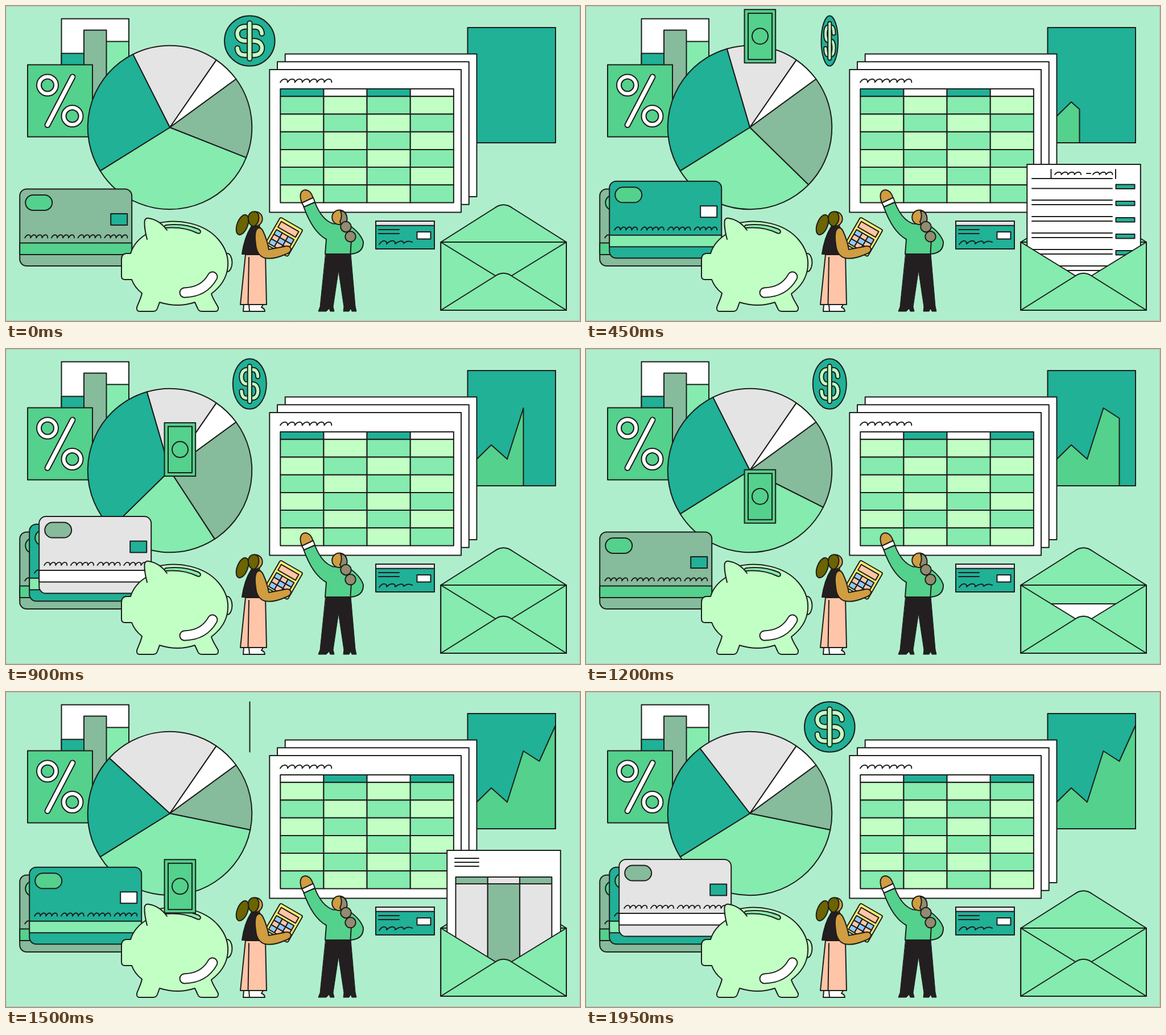
These frames come from a looping animation (1009 px wide and 555 px high, 2.1 s). An HTML page with a canvas:

```html
<!DOCTYPE html>
<html lang="en">
<head>
<meta charset="utf-8">
<title>Money matters</title>
<style>
  html, body { margin: 0; width: 100%; height: 100%; overflow: hidden; background: #afeecd; }
  canvas { display: block; width: 100vw; height: 100vh; }
</style>
</head>
<body>
<canvas id="stage"></canvas>
<script>
const W = 1009, H = 555, STEP = 150, STEPS = 14;
const BG = '#afeecd', INK = '#1d1d1b', TEAL = '#20b197', GREEN = '#54d18c', MINT = '#85ebae',
  PALE = '#c1ffc4', SAGE = '#86bb9c', GREY = '#e4e4e4', WHITE = '#fff', SKIN = '#d09d40',
  OLIVE = '#6b6400', ASH = '#928b70', PEACH = '#ffc5a8', YELLOW = '#ffec70', BLUE = '#8fcbff',
  BLACK = '#231f20';

const canvas = document.getElementById('stage');
const ctx = canvas.getContext('2d');
const ratio = window.devicePixelRatio || 1;
canvas.width = W * ratio;
canvas.height = H * ratio;

function paint(path, fill, width = 2) {
  if (fill) { ctx.fillStyle = fill; ctx.fill(path); }
  if (width) { ctx.lineWidth = width; ctx.strokeStyle = INK; ctx.stroke(path); }
}
const shape = (d, fill, width) => paint(new Path2D(d), fill, width);

function box(x, y, w, h, fill, r = 0) {
  const p = new Path2D();
  if (r) p.roundRect(x, y, w, h, r); else p.rect(x, y, w, h);
  paint(p, fill);
}

function oval(x, y, rx, ry, fill, turn = 0) {
  const p = new Path2D();
  p.ellipse(x, y, rx, ry, turn, 0, Math.PI * 2);
  paint(p, fill);
}

function line(...pts) {
  const p = new Path2D();
  for (let i = 0; i < pts.length; i += 2) p.lineTo(pts[i], pts[i + 1]);
  paint(p);
}

// A thick round stroke with an outline
function tube(path, fill, width) {
  ctx.lineWidth = width + 4;
  ctx.strokeStyle = INK;
  ctx.stroke(path);
  ctx.lineWidth = width;
  ctx.strokeStyle = fill;
  ctx.stroke(path);
}

function scribble(x, y, n, w, h) {
  const p = new Path2D();
  p.moveTo(x, y);
  for (let i = 0; i < n; i++, x += w)
    p.bezierCurveTo(x + w * 0.35, y - h * 1.4, x + w * 1.05, y - h * 1.4, x + w, y);
  paint(p, null, 1.9);
}

function clipped(path, draw) {
  ctx.save();
  ctx.clip(path);
  draw();
  ctx.restore();
}

function barSheet() {
  box(97.5, 22.5, 118.5, 167, WHITE);
  box(97.5, 83.5, 39.5, 106, TEAL);
  box(176, 62.5, 40, 127, MINT);
  box(137, 42.5, 39.5, 147, SAGE);
}

function percentSheet() {
  box(38, 103.5, 114, 127, GREEN);
  for (const [x, y] of [[73, 139.5], [116.5, 194]]) {
    oval(x, y, 19, 19, WHITE);
    oval(x, y, 11, 11, GREEN);
  }
  tube(new Path2D('M117 125 L73 209.5'), WHITE, 7);
}

// Moving borders of the pie, in degrees clockwise from the top, by step
const RIGHT = [111.6, 121.9, 121.9, 134.4, 146.9, 146.9, 146.9, 131.8, 116.7, 101.6];
const TOP = [-26.7, -16.2, -16.2, -16.2, -16.2, -16.2, -16.2, -26.7, -26.7, -26.7, -47.5, -47.5, -47.5, -37.4];

function pie(step) {
  const top = TOP[step], right = RIGHT[Math.min(step, 9)];
  const left = step > 3 && step < 7 ? 225.5 : 238;
  const cuts = [top, 34.5, 53.8, right, left, top + 360];
  const fills = [GREY, WHITE, SAGE, MINT, TEAL];
  const rad = a => (a - 90) * Math.PI / 180;
  fills.forEach((fill, i) => {
    const p = new Path2D();
    p.moveTo(288, 214);
    p.arc(288, 214, 144.3, rad(cuts[i]), rad(cuts[i + 1]));
    p.closePath();
    paint(p, fill);
  });
}

function coin(step) {
  const k = step ? Math.abs((step - 1) % 6 - 3) / 3 : 1;
  if (!k) return line(428.5, 17.5, 428.5, 105.5);
  oval(428.3, 61.5, 44.3 * k, 44.3, TEAL);
  const scaled = d => {
    const p = new Path2D();
    p.addPath(new Path2D(d), new DOMMatrix([k, 0, 0, 1, 428.3, 61.5]));
    return p;
  };
  const width = 3 + 3.4 * k;
  tube(scaled('M21.5 -13 C21 -21 16 -25 9 -25 L-9 -25 C-26 -24 -26 -1 -9 0 L9 0 C26 1 26 24 9 25 L-9 25 C-16 25 -21 21 -21.5 13'), PALE, width);
  tube(scaled('M0 -31 L0 31'), PALE, width);
}

function card(x, y, fill, pill, chip, stripe) {
  ctx.save();
  ctx.translate(x, y);
  box(0, 0, 197, 135.5, fill, 12);
  box(10, 10.5, 47, 27, pill, 13.5);
  box(160, 43.5, 29, 20, chip);
  for (let i = 0; i < 4; i++) scribble(9 + i * 46.7, 86, 4, 10, 5);
  box(0, 95, 197, 20.5, stripe);
  ctx.restore();
}

function cards(step) {
  const looks = [[SAGE, GREEN, TEAL, GREEN], [TEAL, GREEN, WHITE, MINT], [GREY, SAGE, TEAL, WHITE]];
  const count = 1 + Math.min(2, step % 7 >> 1);
  looks.slice(0, count).forEach((look, i) => card(24.2 + 17 * i, 322.5 - 13.7 * i, ...look));
}

function pig() {
  oval(389, 452, 8.5, 16, PALE);
  shape('M262 384 C302 373 349 383 373 411 C398 440 397 480 361 507 C363 515 369 523 373 531 Q374 538 368 538 ' +
    'L344 538 Q339 538 337 533 L332 522 Q302 532 270 522 L266 533 Q264 538 259 538 L235 538 ' +
    'Q229 538 230 531 C233 522 237 516 239 506 Q226 496 221 482 L209 482 Q203 482 203 476 ' +
    'L203 446 Q203 437 211 436 L219 436 Q225 416 245 403 Z', PALE);
  shape('M279 391 Q312 388 336 400 Q341 402 342 398 Q342 395 338 393 Q312 382 281 386 Q277 388 279 391 Z', MINT);
  shape('M248 411 Q243 392 243.5 380 Q244 373 251 374 C264 376 275 384 283 395', PALE);
  tube(new Path2D('M314 505 Q348 504 363 477'), WHITE, 15);
}

function bill(step) {
  const y = 47.5 + 41.3 * (step - 4);
  clipped(new Path2D('M0 0 L500 0 L500 400 L336 400 Q312 388 279 391 L0 391 Z'), () => {
    box(278.5, y, 54.7, 94, GREEN);
    box(285, y + 6.5, 42, 81.5, GREEN);
    oval(306, y + 47, 14, 14, GREEN);
  });
}

const TREND = [[811, 210], [825, 196.5], [853, 169], [881, 194], [909.5, 104], [937.5, 122], [966, 58.5]];

function trendY(x) {
  const i = Math.max(1, TREND.findIndex(p => p[0] >= x));
  const [x0, y0] = TREND[i - 1], [x1, y1] = TREND[i];
  return y0 + (y1 - y0) * (x - x0) / (x1 - x0);
}

function chart(step) {
  box(811.5, 38, 154.5, 203, TEAL);
  const x = Math.min(966, 825.5 + 14 * step);
  const p = new Path2D();
  p.moveTo(811.5, 241);
  for (const [px, py] of TREND) if (px < x) p.lineTo(px, py);
  p.lineTo(x, trendY(x));
  p.lineTo(x, 241);
  p.closePath();
  paint(p, GREEN);
}

function sheets(step) {
  for (let i = 2; i >= 0; i--) box(463.3 + 13.7 * i, 112 - 13.8 * i, 336.8, 251.5, WHITE);
  scribble(482, 134.5, 7, 12.9, 5.5);
  const flip = step >= 7 ? 1 : 0, w = 76.15, h = 31.2;
  for (let c = 0; c < 4; c++) {
    const x = 482.3 + c * w;
    box(x, 146, w, 13.3, (c + flip) % 2 ? WHITE : TEAL);
    for (let r = 0; r < 6; r++)
      box(x, 159.3 + r * h, w, h, (r + c + flip) % 2 ? PALE : MINT);
  }
}

function statement() {
  line(817.5, 9, 817.5, 25);
  line(931, 9, 931, 25);
  scribble(824, 18, 4, 11.5, 4);
  line(880, 16, 887, 16);
  scribble(891, 18, 3, 11.5, 4);
  line(784, 25, 925, 25);
  line(784, 42.5, 925, 42.5);
  box(931.5, 35.5, 33, 7.5, TEAL);
  for (let y = 63; y < 230; y += 29) {
    line(784, y, 925, y);
    line(784, y + 8, 925, y + 8);
    box(931.5, y + 2, 33, 7.5, TEAL);
  }
}

function invoice() {
  for (let i = 0; i < 3; i++) line(789, 14 + 7 * i, 831, 14 + 7 * i);
  for (let i = 0; i < 3; i++) {
    const x = 790.5 + 56.3 * i;
    box(x, 59, 56.3, 185, i === 1 ? SAGE : GREY);
    box(x, 47, 56.3, 12, i === 1 ? GREY : SAGE);
  }
}

function letter(step) {
  const top = 279 + 85 * Math.abs(step % 7 - 3);
  if (top > 500) return;
  const room = new Path2D();
  room.rect(760, 0, 230, 530);
  clipped(room, () => {
    ctx.translate(0, top);
    box(775.3, 0, 199.5, 258, WHITE);
    (step < 7 ? statement : invoice)();
  });
}

function envelope(step) {
  shape('M764.3 416 L858 356.5 Q874.5 344 891 356.5 L985 416 Z', MINT);
  shape('M764.3 416 L985 416 L985 536 L764.3 536 Z', MINT);
  letter(step);
  shape('M764.3 416 L874.5 484 L985 416 L985 536 L764.3 536 Z', MINT);
  shape('M764.3 536 L858 477 Q874.5 464.5 891 477 L985 536 Z', MINT);
}

function check() {
  box(650, 379, 103, 49, TEAL);
  box(650, 379, 103, 7.8, GREY);
  line(655, 394, 691, 394);
  line(655, 401, 691, 401);
  box(722.5, 398, 24, 12.5, WHITE);
  shape('M656 420 C662 411 670 413 669 419 C676 412 685 412 684 419 C690 414 698 412 699 418 Q706 412 714 416');
}

function calculator() {
  ctx.save();
  ctx.translate(482.5, 372);
  ctx.rotate(Math.PI / 6);
  box(0, 0, 45.5, 54, YELLOW, 3);
  box(5, 6, 35.5, 11.5, PEACH);
  for (let r = 0; r < 3; r++)
    for (let c = 0; c < 3; c++)
      box(5 + c * 11.8, 22.5 + r * 9.3, 11.8, 9.3, (r + c) % 2 ? PEACH : BLUE);
  ctx.restore();
}

function woman() {
  shape('M418 526 L417 538 L455 538 Q455 533 449 531 L452 526 Z', WHITE);
  line(427, 526, 428, 538);
  shape('M421 438 L456 438 L458 526 L412 526 Z', PEACH);
  line(427, 443, 425.5, 526);
  oval(415.5, 385.5, 9.2, 18.5, OLIVE, 0.36);
  shape('M433 380 L445 380 L446 393 L431 393 Z', SKIN);
  shape('M431 389 Q444 386 447 391 L450 438 L415 437 Q419 408 431 389 Z', BLACK);
  oval(438.5, 375, 12.2, 12.5, SKIN);
  shape('M440 363 C431 360 425 367 426 376 C427 387 436 391 440 385 C446 378 446 367 440 363 Z', OLIVE);
  calculator();
  shape('M441 393 Q447 387 452 397 Q459 412 462 429 L488 424 Q499 421 501 428 Q501 435 490 438 ' +
    'Q470 447 455 444 Q441 440 439 420 Q436 400 441 393 Z', SKIN);
}

function man() {
  shape('M562 436 L606 436 L614 529 L616 538 L608 538 L606 533 L603 538 L593 538 L594 530 L584.5 466 ' +
    'L575 530 L577 538 L570 538 L568 533 L563 538 L549 538 L552 530 Z', BLACK, 1);
  shape('M543 346 Q555 377 575 383.5 L600 384 Q622 398 628 415 Q629 435 606 437 L561 437 L563 411 ' +
    'Q539 398 523 353 Z', GREEN);
  line(607, 412, 605.5, 436);
  shape('M519 344 C516 334 517 325 526 324 C535 325 538 332 540 339 L521 348 Z', SKIN);
  shape('M520 347 L540 337.5 L543 345.5 L524 354 Z', WHITE);
  oval(586, 372.3, 12.8, 12.8, SKIN);
  shape('M588 361 C599 361 603 376 596 384 Q589 387 587 380 Q592 370 588 361 Z', ASH);
  oval(597.5, 389, 9.3, 9.3, ASH);
  oval(605.5, 406.3, 9.3, 9.3, ASH);
}

function draw(step) {
  ctx.setTransform(ratio, 0, 0, ratio, 0, 0);
  ctx.lineJoin = ctx.lineCap = 'round';
  ctx.fillStyle = BG;
  ctx.fillRect(0, 0, W, H);
  barSheet();
  percentSheet();
  pie(step);
  coin(step);
  cards(step);
  pig();
  bill(step);
  chart(step);
  sheets(step);
  check();
  envelope(step);
  woman();
  man();
  ctx.lineWidth = 1;
  ctx.strokeStyle = '#b9bdbb';
  ctx.strokeRect(0.5, 0.5, W - 1, H - 1);
}

const start = performance.now();
function tick() {
  draw(Math.floor((performance.now() - start) / STEP) % STEPS);
  requestAnimationFrame(tick);
}
tick();
</script>
</body>
</html>
```
